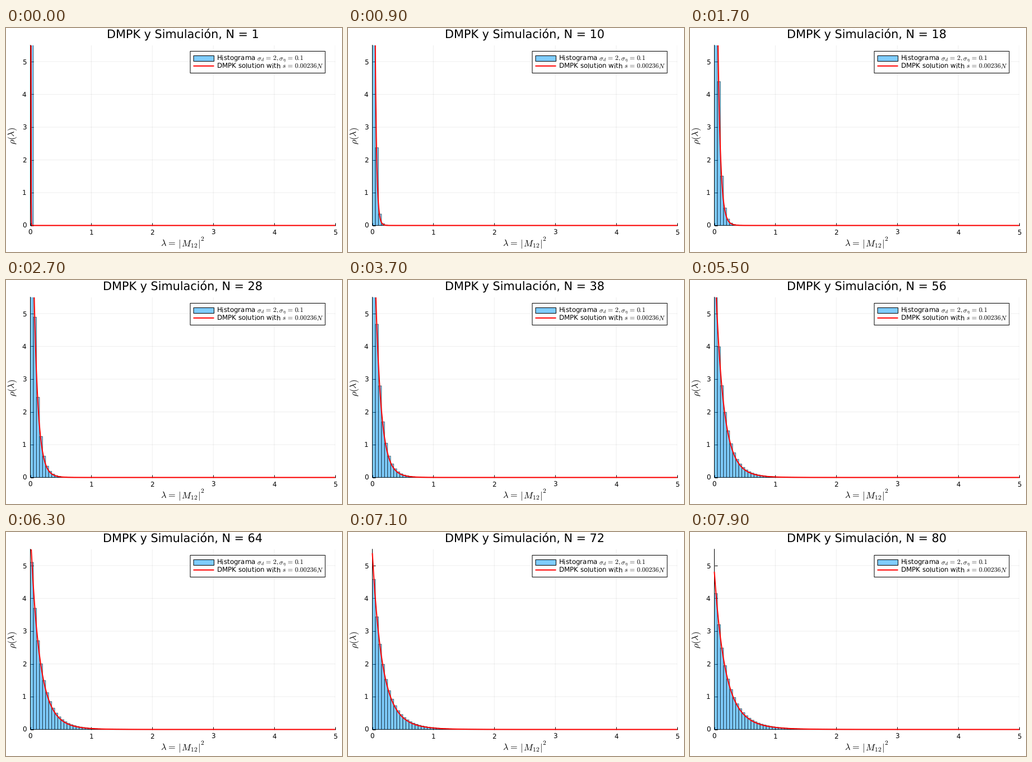
Recreate the animation shown at these times as a matplotlib script. Size 600x400 px, loop 8 s.

```python
import numpy as np
import matplotlib.pyplot as plt
from matplotlib.animation import FuncAnimation
from matplotlib.collections import PolyCollection
from matplotlib.patches import Rectangle
from matplotlib.transforms import Bbox, TransformedBbox

W, H, DPI = 600, 400, 100
PX = 72 / DPI                      # points per pixel
LEFT, RIGHT, TOP, BOTTOM = 43.5, 587.9, 30.7, 352.6
FRAMES, INTERVAL = 80, 100
RATE = 0.00236                     # s = RATE * N
SPREAD = 1.05                      # the simulation diffuses slightly faster
LOSS = 0.967                       # quadrature loss of the plotted solution
BINS, BIN, SUB = 100, 0.05, 8
FILL = (0, 154 / 255, 250 / 255, 0.5)
EQ = r"\;\!=\;\!"                  # equals sign with TeX spacing

plt.rcParams.update({
    "font.family": "DejaVu Sans",
    "mathtext.fontset": "cm",
    "text.hinting": "none",
    "path.snap": False,
})


def dmpk(lam, s):
    """One-channel DMPK density of lam at length s."""
    w = np.linspace(0, 12, 160) * np.sqrt(s)
    u = np.arccosh(1 + 2 * lam[:, None] + w ** 2)
    f = 2 * u / np.sinh(u) * np.exp(-u ** 2 / (4 * s))
    area = (f.sum(axis=1) - (f[:, 0] + f[:, -1]) / 2) * (w[1] - w[0])
    return 4 * np.pi * np.sqrt(2) * np.exp(-s / 4) / (4 * np.pi * s) ** 1.5 * area


edges = np.arange(BINS) * BIN
mids = (np.arange(BINS * SUB) + 0.5) * BIN / SUB
lam = np.linspace(1e-6, 5, 1001)


def heights(n):
    return dmpk(mids, SPREAD * RATE * n).reshape(BINS, SUB).mean(axis=1)


fig = plt.figure(figsize=(W / DPI, H / DPI), dpi=DPI, facecolor="white")
ax = fig.add_axes([LEFT / W, 1 - BOTTOM / H, (RIGHT - LEFT) / W, (BOTTOM - TOP) / H])
ax.set(xlim=(0, 5), ylim=(0, 5.5), xticks=range(6), yticks=range(6))
ax.set_axisbelow(True)
ax.grid(color="black", alpha=0.065, lw=PX)
ax.tick_params(direction="in", length=5 * PX, width=PX,
               labelbottom=False, labelleft=False)
for side in ("top", "right"):
    ax.spines[side].set_visible(False)
for side in ("left", "bottom"):
    ax.spines[side].set(linewidth=PX, zorder=1)

# Overlay in pixels for text and legend
over = fig.add_axes([0, 0, 1, 1])
over.set(xlim=(0, W), ylim=(H, 0))
over.axis("off")


def label(x, y, text, size, ha="center", **kw):
    kw.setdefault("va", "baseline")
    return over.text(x, y, text, fontsize=size * PX, ha=ha, **kw)


def box(x0, y0, x1, y1, fill):
    over.add_patch(Rectangle((x0, y0), x1 - x0, y1 - y0, facecolor=fill,
                             edgecolor="black", lw=PX))


for i in range(6):
    label(LEFT + i * (RIGHT - LEFT) / 5, 368.7, str(i), 11.9)
    label(36.4, BOTTOM - i * (BOTTOM - TOP) / 5.5 + 4.4, str(i), 11.9, "right")

title = label((LEFT + RIGHT) / 2, 18.6, "", 20.8)
label(276, 390, rf"$\lambda{EQ}|\,M_{{12}}|$", 16.3, "left")
label(350.5, 380.5, "$2$", 11.4)
label(12, 192.5, r"$\rho(\lambda)$", 16.3, rotation=90, va="center")

box(329, 41.5, 570, 80.5, "white")
box(335, 49.5, 371.5, 59.5, FILL)
over.plot([334.5, 371.5], [67.8, 67.8], color="red", lw=2 * PX, solid_capstyle="butt")
label(375.7, 57, rf"Histograma $\sigma_d{EQ}2, \sigma_\eta{EQ}0.1$", 11.9, "left")
label(375.7, 72, rf"DMPK solution with $s{EQ}0.00236N$", 11.9, "left")

bars = PolyCollection([], facecolors=[FILL], edgecolors=[(0, 0, 0, 0.55)],
                      linewidths=PX, zorder=2)
ax.add_collection(bars, autolim=False)
curve, = ax.plot([], [], color="red", lw=2 * PX, zorder=3, solid_capstyle="butt")
curve.set_clip_box(TransformedBbox(
    Bbox([[40 / W, 1 - 356 / H], [592 / W, 1 - TOP / H]]), fig.transFigure))


def draw(i):
    n = i + 1
    title.set_text(f"DMPK y Simulación, N = {n}")
    bars.set_verts([[(x, 0), (x, h), (x + BIN, h), (x + BIN, 0)]
                    for x, h in zip(edges, heights(n)) if h > 0.002])
    curve.set_data(lam, LOSS * dmpk(lam, RATE * n))
    return title, bars, curve


anim = FuncAnimation(fig, draw, frames=FRAMES, interval=INTERVAL,
                     repeat=True, repeat_delay=0, blit=False)
plt.show()
```
